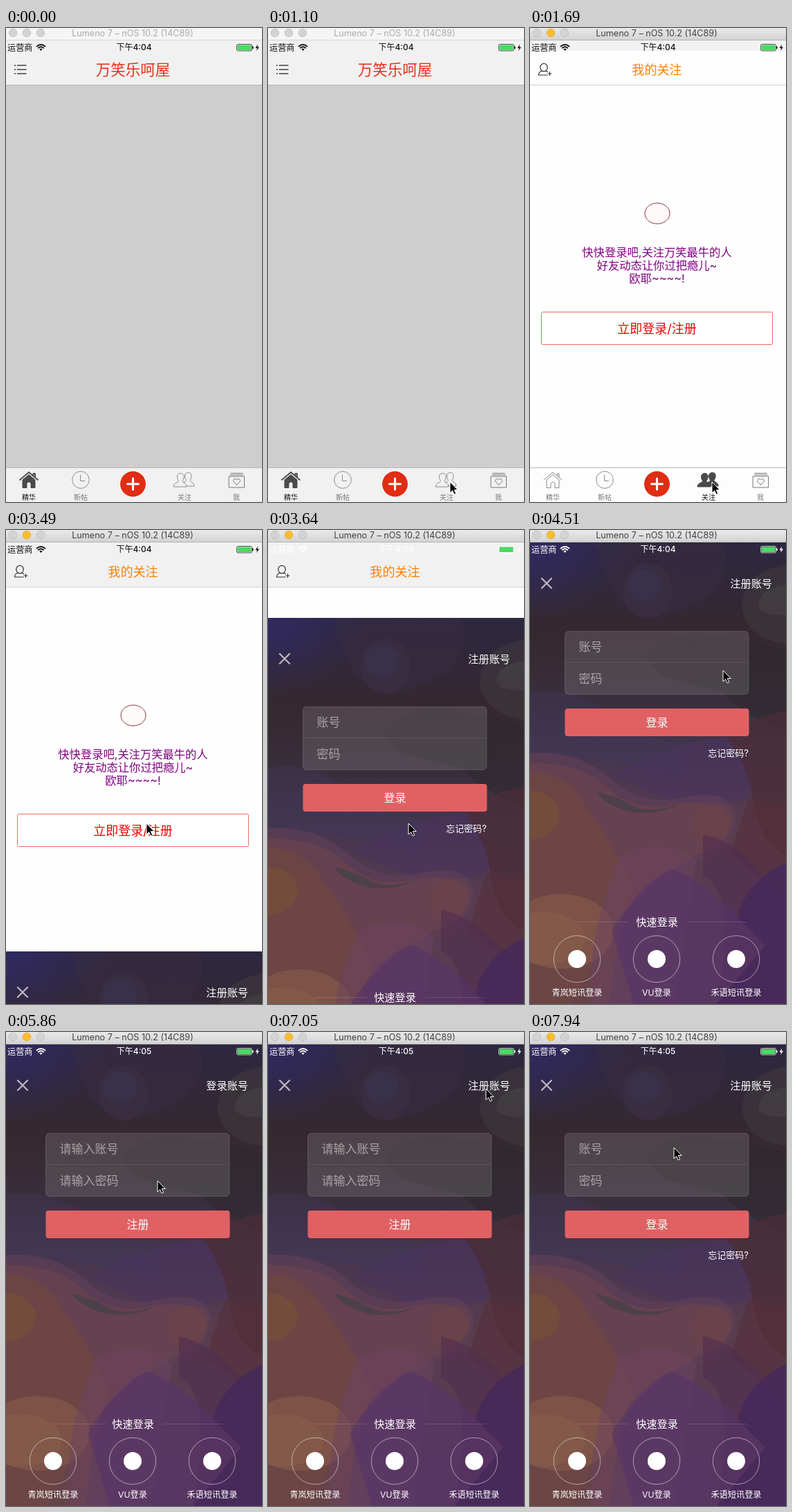
Animation of 370x685 px, one loop 8000 ms. Source, as an HTML page:

```html
<!DOCTYPE html>
<html lang="zh-CN">
<head>
<meta charset="utf-8">
<title>Login demo</title>
<style>
  html, body { margin: 0; width: 100%; height: 100%; overflow: hidden; background: #fefefe; }
  svg { display: block; width: 370px; height: 685px; }
  text { font-family: Inter, "Noto Sans CJK SC", "Noto Sans CJK", sans-serif; }
</style>
</head>
<body>
<svg id="stage" viewBox="0 0 370 685"></svg>
<script>
const LOOP = 8000;
const stage = document.getElementById('stage');

// ---------- drawing helpers ----------
const rect = (x, y, w, h, fill, more = '') =>
  `<rect x="${x}" y="${y}" width="${w}" height="${h}" fill="${fill}" ${more}/>`;
const circle = (x, y, r, fill, more = '') =>
  `<circle cx="${x}" cy="${y}" r="${r}" fill="${fill}" ${more}/>`;
const ellipse = (x, y, rx, ry, fill, more = '') =>
  `<ellipse cx="${x}" cy="${y}" rx="${rx}" ry="${ry}" fill="${fill}" ${more}/>`;
const shape = (d, fill, more = '') => `<path d="${d}" fill="${fill}" ${more}/>`;
const line = (d, color, width = 1) =>
  shape(d, 'none', `stroke="${color}" stroke-width="${width}" stroke-linecap="round" stroke-linejoin="round"`);
const group = (id, body, more = '') => `<g id="${id}" ${more}>${body}</g>`;
// y is the visual middle of the line
const text = (x, y, size, str, fill, anchor = 'start', more = '') =>
  `<text x="${x}" y="${y + size * 0.37}" font-size="${size}" fill="${fill}" text-anchor="${anchor}" ${more}>${str}</text>`;

// ---------- window and status bar ----------
function titleBar() {
  const title = 'Lumeno 7 – nOS 10.2 (14C89)';
  const dots = middle => [10, 30, 50].map(x =>
    circle(x, 7, 6, x === 30 ? middle : '#d3d3d3', 'stroke="#00000018"')).join('');
  return group('inactive', rect(0, 0, 370, 18, '#f5f5f5') + dots('#d3d3d3') +
      text(183, 7, 12.6, title, '#aaa', 'middle') + rect(0, 17, 370, 1, '#d4d4d4')) +
    group('active', rect(0, 0, 370, 18, 'url(#chrome)') + dots('#fdbc2f') +
      text(183, 7, 12.6, title, '#404040', 'middle') + rect(0, 17, 370, 1, '#b4b4b4'));
}

function statusBar() {
  const wifi = line('M44.5 26.5Q50.5 21.5 56.5 26.5M46.8 28.8Q50.5 25.8 54.2 28.8', 'currentColor', 1.8) +
    shape('M48.3 30.6Q50.5 29 52.7 30.6L50.5 33Z', 'currentColor');
  const battery = rect(333.5, 23.5, 22, 9.5, 'none', 'rx="2" stroke="currentColor" stroke-opacity=".7"') +
    rect(334.5, 24.5, 20, 7.5, '#4cd964', 'rx="1"') + rect(356, 26.5, 1.5, 3.5, 'currentColor') +
    shape('M364 23.5L360.5 29H363L362 33L366 27.5H363.4Z', 'currentColor');
  return group('status', text(2, 28, 12.2, '运营商', 'currentColor') + wifi +
    text(185, 28, 12, '下午<tspan id="clock"></tspan>', 'currentColor', 'middle', 'font-weight="500"') + battery);
}

// ---------- tab screens ----------
const person = (x, y, fill, ink) => shape(
  `M${x} ${y}c-5.500 0-6.500 6-3 11c0 3-7.500 2.500-7.500 8.500h19c0-6-6-5.500-6-8.500c3.500-5 3-11-2.500-11Z`, fill, `stroke="${ink}"`);

function tabBar(selected, bg) {
  const ink = i => i === selected ? '#4a4a4a' : '#8a8a8a';
  const fill = i => i === selected ? '#4a4a4a' : bg;
  const home = line('M20 653L33 642L46 653M39.5 647V644H42V649', ink(0), selected === 0 ? 1.8 : 1) +
    shape('M24 653L33 645.5L42 653V664.5H36V658Q33 654 30 658V664.5H24Z', fill(0), `stroke="${ink(0)}"`);
  const clock = circle(108, 653, 12.3, 'none', 'stroke="#8a8a8a"') + line('M107.5 646V654.5H113.5', '#8a8a8a');
  const plus = circle(183.5, 659, 19.5, '#fff') + circle(183.5, 659, 18.5, '#e02d14') +
    line('M175.5 659H191.5M183.5 651V667', '#fff', 3);
  const people = person(263.5, 642.5, fill(3), ink(3)) + person(252.5, 643.5, fill(3), ink(3));
  const box = line('M325 643.5H342M324 645.8H343M322.5 648H344.5V664H322.5Z', '#777') +
    line('M333.5 660Q328 656 328.5 653.5Q331 649.5 333.5 653Q336 649.5 338.5 653.5Q339 656 333.5 660Z', '#777');
  const labels = ['精华', '新帖', '', '关注', '我'].map((s, i) =>
    text(33 + 75 * i, 678, 10, s, i === selected ? '#111' : '#777', 'middle', i === selected ? 'font-weight="500"' : '')).join('');
  return rect(0, 635, 370, 50, bg) + rect(0, 635, 370, 1, '#b9b9b9') + home + clock + plus + people + box + labels;
}

function homeScreen() {
  const menu = [54, 60, 66].map(y => circle(13, y, 1, '#333') + rect(16, y - .7, 13.5, 1.4, '#333')).join('');
  return group('home', rect(0, 18, 370, 667, '#cecece') + rect(0, 18, 370, 64, '#f1f1f1') +
    rect(0, 82, 370, 1, '#b5b5b5') + menu +
    text(183.5, 60, 21.5, '万笑乐呵屋', '#e5301c', 'middle', 'font-weight="300"') + tabBar(0, '#f1f1f1'));
}

function followScreen() {
  const addFriend = ellipse(20, 57, 5.2, 5.7, 'none', 'stroke="#333" stroke-width="1.2"') +
    line('M17 62Q12.500 63.500 12.500 68H25M23 62L25.500 63.500M26 66H31M28.500 63.500V68.500', '#333', 1.2);
  const message = ['快快登录吧,关注万笑最牛的人', '好友动态让你过把瘾儿~', '欧耶~~~~!'].map((s, i) =>
    text(183.5, 323.5 + 19 * i, 16.3, s, '#800080', 'middle')).join('');
  return group('follow', rect(0, 18, 370, 667, '#fefefe') + rect(0, 18, 370, 15, '#f2f2f2') +
    group('navTint', rect(0, 18, 370, 64, '#f1f1f1')) + rect(0, 82, 370, 1, '#d2d2d2') + addFriend +
    text(183.5, 60, 18.1, '我的关注', '#ff8000', 'middle') +
    ellipse(184, 268, 18, 15, '#fffafa', 'stroke="#8b3a3a"') + message +
    rect(16.5, 410.5, 334, 47, '#fff', 'rx="2" stroke="#f0695c"') +
    text(183.5, 434, 18, '立即登录/注册', '#f00000', 'middle') + tabBar(3, '#fdfdfd'));
}

// ---------- login screen ----------
function backdrop() {
  const soft = (d, fill, opacity = .6) => shape(d, fill, `opacity="${opacity}"`);
  return rect(0, 18, 370, 667, 'url(#dusk)') + rect(0, 18, 150, 110, 'url(#indigo)') +
    soft('M95 18Q120 150 210 120Q300 90 280 18Z', '#392c42', .5) +
    ellipse(170, 88, 36, 40, '#3d3044', 'opacity=".6"') + ellipse(165, 80, 25, 23, '#38354f', 'opacity=".6"') +
    soft('M370 50Q310 60 306 110Q310 155 370 165Z', '#403a3f') +
    soft('M370 80Q330 85 330 112Q340 125 370 122Z', '#464147') +
    soft('M168 185Q180 155 240 150Q330 160 370 175V290Q310 270 280 235Q230 225 190 210Z', '#2e282d') +
    soft('M0 235Q60 225 110 262Q150 300 220 310V360Q90 320 0 325Z', '#40385a', .4) +
    soft('M120 355Q220 300 290 300Q330 330 318 385Q260 410 200 390Z', '#4a3260', .5) +
    soft('M285 300Q320 270 370 262V470Q330 450 322 390Q315 340 285 300Z', '#4b2d37', .75) +
    // warm slopes on the left
    soft('M0 322Q70 318 115 358Q155 398 215 388Q290 370 298 415Q290 470 240 480L190 500L120 570L60 685H0Z', '#5f3f58', .7) +
    soft('M0 337Q70 335 110 370Q150 412 215 395Q285 385 290 425Q280 460 240 470L190 500L120 570L60 685H0Z', '#6b434d', .7) +
    soft('M95 378Q130 386 150 400Q180 410 215 396Q190 412 150 408Q110 400 95 378Z', '#474049', .8) +
    soft('M0 350Q55 350 80 400Q120 450 150 520Q125 580 115 685H0Z', '#71493f') +
    ellipse(0, 412, 43, 35, '#775039', 'opacity=".7"') +
    ellipse(45, 580, 76, 54, '#835849', 'opacity=".75"') + ellipse(20, 590, 60, 38, '#885e4b', 'opacity=".6"') +
    soft('M240 405Q285 380 293 415Q290 455 255 458Q225 440 240 405Z', '#6d444b', .5) +
    // red and violet on the right
    soft('M318 385Q350 400 370 395V540Q330 500 290 470Q300 430 318 385Z', '#56303b') +
    soft('M250 440Q310 450 370 540V685H270Q300 520 250 500Z', '#522e50') +
    soft('M130 470Q200 440 240 480L210 685H90Q80 590 130 470Z', '#6c4463', .5) +
    soft('M205 490Q260 510 340 600L290 685H150L118 580Q160 510 205 490Z', '#573369') +
    soft('M370 480Q310 510 300 560L340 600L270 685H370Z', '#44285a', .8);
}

function fields(account, password, action) {
  return rect(50.5, 146.5, 265.500, 91, '#fff', 'rx="5" fill-opacity=".12" stroke="#fff" stroke-opacity=".14"') +
    rect(51, 191, 265, 1, '#fff', 'opacity=".08"') +
    text(70.5, 168.5, 17, account, '#a9a3a6') + text(70.5, 214.5, 17, password, '#a9a3a6') +
    rect(50.5, 258, 266, 40, '#e06164', 'rx="4"') + text(183.5, 278.5, 16, action, '#fff', 'middle');
}

function loginScreen() {
  const services = ['青岚短讯登录', 'VU登录', '禾语短讯登录'].map((s, i) => {
    const x = 68 + 115 * i;
    return circle(x, 620, 33.7, 'none', 'stroke="#fff" stroke-opacity=".5"') + circle(x, 620, 13, '#fff') +
      text(x, 668, 12.2, s, '#fff', 'middle');
  }).join('');
  return group('login', backdrop() + line('M17 70L31 84M31 70L17 84', '#b9b5bc', 2.4) +
    text(350, 77.5, 15.2, '<tspan id="modeLabel"></tspan>账号', '#fff', 'end') +
    group('signIn', fields('账号', '密码', '登录') + text(316, 322, 13, '忘记密码?', '#fff', 'end')) +
    group('signUp', fields('请输入账号', '请输入密码', '注册')) +
    rect(68, 566, 74, 1, '#fff', 'opacity=".13"') + rect(228, 566, 86, 1, '#fff', 'opacity=".13"') +
    text(183.5, 566.5, 15.2, '快速登录', '#fff', 'middle') + services);
}

const gradient = (id, stops) => `<linearGradient id="${id}" x2="0" y2="1">` +
  stops.map(([at, color]) => `<stop offset="${at}" stop-color="${color}"/>`).join('') + '</linearGradient>';

stage.innerHTML = '<defs>' + gradient('chrome', [[0, '#e9e9e9'], [1, '#d2d2d2']]) +
  gradient('dusk', [[0, '#2d2740'], [.2, '#35292f'], [.34, '#392f3c'], [.46, '#45364f'], [.62, '#593c4d'], [1, '#593c58']]) +
  '<radialGradient id="indigo" cx="0" cy="0" r="1"><stop stop-color="#312a62"/>' +
  '<stop offset="1" stop-color="#312a62" stop-opacity="0"/></radialGradient></defs>' +
  homeScreen() + followScreen() + loginScreen() + statusBar() + titleBar() +
  group('cursor', shape('M0 0V16L3.700 12.600L6.100 18L8.700 16.900L6.300 11.500H11.200Z', '#000', 'stroke="#fff"'));

// ---------- motion ----------
// Bursts of screen updates: first, last, count
const bursts = [[0, 0, 1], [500, 1100, 5], [1690, 1690, 1], [2140, 3040, 7], [3490, 4510, 8],
  [4660, 5560, 7], [5710, 6750, 8], [7050, 7050, 1], [7350, 7940, 5]];

// Cursor tip: time, x, y
const cursorKeys = [[500, 92, 505], [1100, 263, 656], [1990, 263, 656], [3040, 203, 424], [3780, 203, 424],
  [4510, 279, 203], [5110, 324, 120], [5410, 318, 82], [5560, 318, 82], [5860, 219, 215],
  [6150, 219, 215], [6750, 315, 82], [7350, 315, 82], [7940, 208, 167]];

function lastUpdate(t) {
  const [first, last, count] = bursts.findLast(b => b[0] <= t);
  if (count === 1) return first;
  const gap = (last - first) / (count - 1);
  return first + gap * Math.min(count - 1, Math.floor((t - first + 6) / gap));
}

const smooth = (t, start, duration) => {
  const x = Math.min(1, Math.max(0, (t - start) / duration));
  return x * x * (3 - 2 * x);
};

function cursorAt(t) {
  const next = cursorKeys.findIndex(k => k[0] > t);
  if (next < 0) return cursorKeys.at(-1).slice(1);
  const a = cursorKeys[Math.max(0, next - 1)], b = cursorKeys[next];
  const p = smooth(t, a[0], b[0] - a[0]);
  return [a[1] + (b[1] - a[1]) * p, a[2] + (b[2] - a[2]) * p];
}

const el = id => document.getElementById(id);
const show = (id, on) => el(id).setAttribute('display', on ? 'inline' : 'none');
const move = (id, x, y) => el(id).setAttribute('transform', `translate(${x.toFixed(1)} ${y.toFixed(1)})`);

function render(now) {
  const t = lastUpdate(now % LOOP);
  const switched = t >= 1690;
  show('home', !switched);
  show('inactive', !switched);
  show('follow', switched);
  show('active', switched);
  show('navTint', t >= 3490);

  // The sheet rises on a critically damped spring.
  const s = 0.0184 * (t - 3458.6);
  show('login', s > 0);
  move('login', 0, Math.round(667 * (1 + s) * Math.exp(-s)));

  const page = smooth(t, 5511, 215) - smooth(t, 7146, 215);
  move('signIn', -370 * page, 0);
  move('signUp', 377 - 370 * page, 0);
  el('modeLabel').textContent = t >= 5550 && t < 7050 ? '登录' : '注册';

  el('status').setAttribute('color', t > 3600 ? '#fff' : '#111');
  el('clock').textContent = t >= 4950 ? '4:05' : '4:04';

  show('cursor', t >= 500);
  move('cursor', ...cursorAt(t));
}

function tick() {
  render(performance.now());
  requestAnimationFrame(tick);
}
tick();
</script>
</body>
</html>
```
